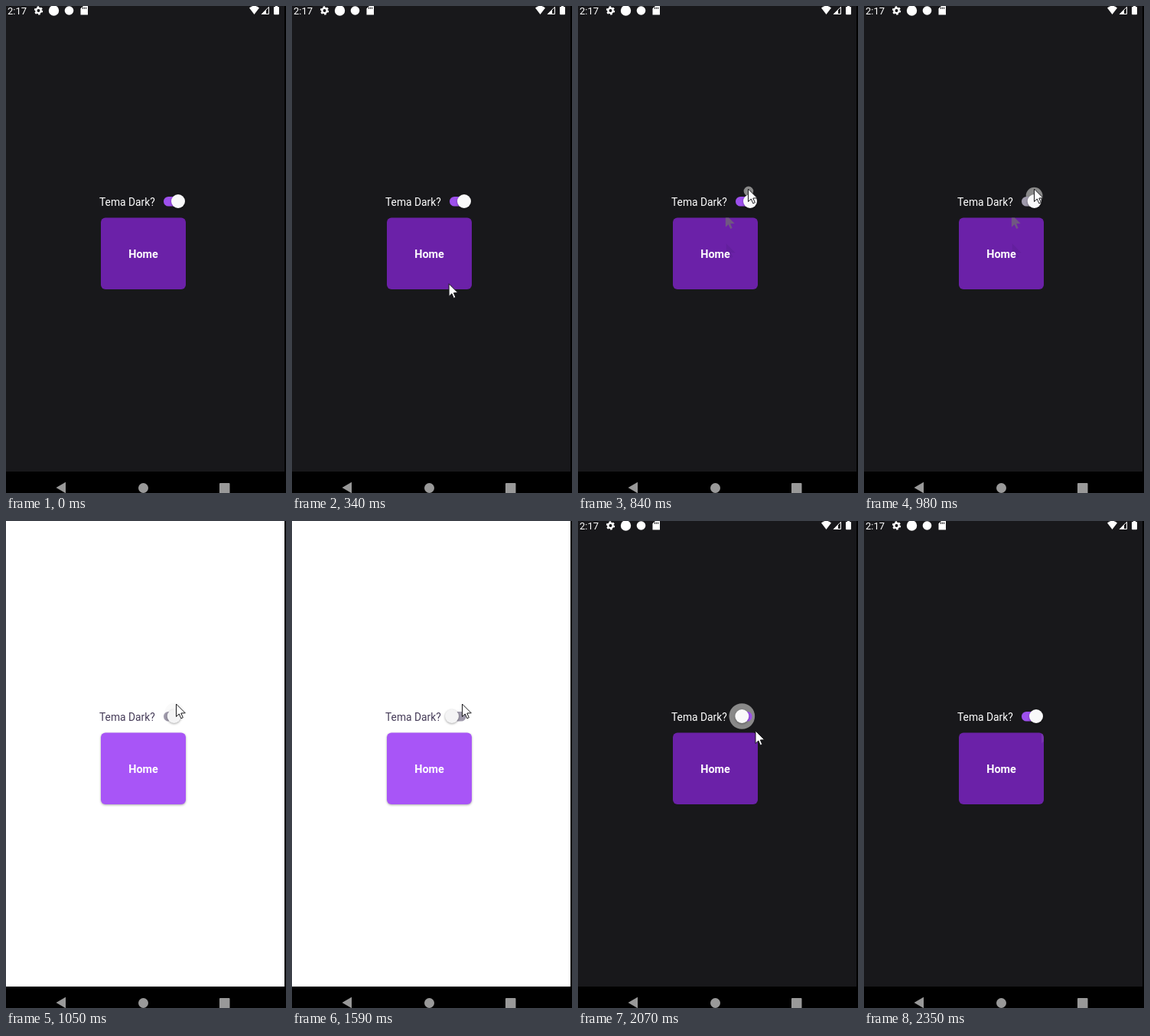
These frames come from a looping animation (366 by 636 pixels, 2.75 s). An HTML page with a canvas:

```html
<!DOCTYPE html>
<html lang="pt">
<head>
<meta charset="utf-8">
<style>
html, body { margin: 0; width: 366px; height: 636px; overflow: hidden; background: #000; }
canvas { display: block; }
</style>
</head>
<body>
<canvas id="stage" width="366" height="636"></canvas>
<script>
const c = document.getElementById('stage').getContext('2d');
const LOOP = 2750, TO_LIGHT = 1050, TO_DARK = 2070;

// Bursts of stepped movement: first step, last step, number of steps
const BURSTS = [[130, 620, 8], [770, 1260, 8], [1520, 2000, 7], [2070, 2350, 5]];

const lerp = (a, b, p) => a + (b - a) * p;
const mix = (a, b, p) => a.map((v, i) => lerp(v, b[i], p));
const progress = (t, from, to) => Math.min(1, Math.max(0, (t - from) / (to - from)));

function stepTime(t) {
  let q = 0;
  for (const [start, end, n] of BURSTS) {
    if (t < start) break;
    const step = (end - start) / (n - 1);
    q = Math.min(end, start + Math.floor((t - start) / step + 1e-6) * step);
  }
  return Math.round(q);
}

// The pointer curves in, taps twice and leaves in a straight line
const FIRST_TAP = [222.5, 239], SECOND_TAP = [219.5, 256], EXIT = [232, 274];
const arrival = p => {
  const bend = [134, 247];
  return mix(mix([302, 606], bend, p), mix(bend, FIRST_TAP, p), p);
};

function cursorAt(t) {
  if (t < 1520) return arrival(progress(t, 130, 620));
  if (t < TO_DARK) return mix(FIRST_TAP, SECOND_TAP, progress(t, 1520, 1680));
  return mix(EXIT, [325, 620], progress(t, TO_DARK, 2350));
}

function thumbAt(t) {
  const slide = start => progress(t, start, start + 350) ** 1.2;
  return 225 - 16 * (slide(910) - slide(1930));
}

function rect(x, y, w, h, color, r = 0) {
  c.fillStyle = color;
  c.beginPath();
  c.roundRect(x, y, w, h, r);
  c.fill();
}

function disc(x, y, r, color) {
  c.fillStyle = color;
  c.beginPath();
  c.arc(x, y, r, 0, 2 * Math.PI);
  c.fill();
}

function poly(color, ...p) {
  c.fillStyle = color;
  c.beginPath();
  for (let i = 0; i < p.length; i += 2) c.lineTo(p[i], p[i + 1]);
  c.closePath();
  c.fill();
}

function text(s, x, y, font, color, align = 'left') {
  c.font = font + ' Roboto, sans-serif';
  c.fillStyle = color;
  c.textAlign = align;
  c.fillText(s, x, y);
}

function raised(paint) {
  c.save();
  c.shadowColor = 'rgba(0,0,0,.35)';
  c.shadowBlur = 3;
  c.shadowOffsetY = 1;
  paint();
  c.restore();
}

function arrow([x, y], color, outline) {
  c.save();
  c.translate(x, y);
  poly(color, 0, 0, 0, 16.5, 3.8, 13, 6.3, 18.8, 8.8, 17.7, 6.3, 12, 11.8, 11.8);
  if (outline) {
    c.strokeStyle = outline;
    c.lineWidth = 1;
    c.stroke();
  }
  c.restore();
}

function ring(x, y, r, width, dash = []) {
  c.strokeStyle = '#fff';
  c.lineWidth = width;
  c.setLineDash(dash);
  c.beginPath();
  c.arc(x, y, r, 0, 2 * Math.PI);
  c.stroke();
  c.setLineDash([]);
}

function statusBar() {
  text('2:17', 2, 11, '13px', '#fff');
  // settings gear
  ring(42.5, 6, 3.2, 2.4);
  ring(42.5, 6, 4.8, 1.8, [2.5, 2.53]);
  disc(62.5, 6, 6.7, '#fff');
  disc(82.5, 6, 5.8, '#fff');
  // memory card
  poly('#fff', 101, 0, 107, 0, 107, 11.5, 97.5, 11.5, 97.5, 3.5);
  for (let i = 0; i < 3; i++) rect(100 + i * 2.1, 1.5, 1, 2.5, '#18181b');
  // wifi
  c.fillStyle = '#fff';
  c.beginPath();
  c.moveTo(324.5, 11);
  c.lineTo(318, 2.5);
  c.quadraticCurveTo(324.5, -3, 331, 2.5);
  c.fill();
  // signal
  poly('#fff', 333.5, 11, 340, 4.5, 340, 11);
  c.strokeStyle = '#fff';
  c.lineWidth = 1;
  c.beginPath();
  c.moveTo(334.5, 10.5);
  c.lineTo(343.5, 1.3);
  c.lineTo(343.5, 10.5);
  c.closePath();
  c.stroke();
  // battery
  rect(350, 1, 7, 10.3, '#fff', 1);
  rect(352, 0, 3, 2, '#fff');
}

function navBar() {
  rect(0, 608, 366, 28, '#000');
  rect(364, 0, 2, 636, '#000');
  poly('#999', 65.5, 629, 78, 621.7, 78, 636.3);
  disc(179.5, 629.5, 6.5, '#999');
  rect(279, 623, 13.5, 13.5, '#999', 1);
}

// Faint marks the pointer leaves on the button
function smudges(t) {
  c.save();
  c.beginPath();
  c.roundRect(124, 276.5, 111, 93.5, 6);
  c.clip();
  if (t >= 620 && t < TO_LIGHT) {
    arrow(arrival(4 / 7), 'rgba(40,20,80,.12)');
    arrow(arrival(5 / 7), 'rgba(115,110,115,.7)');
  }
  if (t > TO_DARK) arrow(EXIT, 'rgba(255,255,255,.08)');
  c.restore();
}

function ripple(t, thumb, dark) {
  const [press, origin] = t < 1520 ? [770, FIRST_TAP] : [1680, SECOND_TAP];
  if (t < press) return;
  const grow = progress(t, press, press + 390);
  const [x, y] = mix(origin, [thumb, 255], grow);
  c.globalAlpha = 1 - progress(t, press + 390, press + 490);
  disc(x, y, 4 + 12.8 * grow, dark ? '#898989' : '#fafafa');
  c.globalAlpha = 1;
}

function toggle(t, dark) {
  const thumb = thumbAt(t);
  const on = t < 980 || t >= 2000;
  ripple(t, thumb, dark);
  rect(206, 249, 21.5, 12.6, on ? '#9d50ec' : '#9f9aab', 6.3);
  raised(() => disc(thumb, 255, 9, dark ? '#f9f9fa' : '#f4f4f5'));
}

function button(dark) {
  const paint = () => rect(124, 276.5, 111, 93.5, dark ? '#6b21a8' : '#a855f7', 6);
  dark ? paint() : raised(paint);
}

function draw(time) {
  const t = stepTime(time);
  const dark = t < TO_LIGHT || t >= TO_DARK;
  rect(0, 0, 366, 636, dark ? '#18181b' : '#fff');
  if (dark) statusBar();
  text('Tema Dark?', 122, 260.5, '13.8px', dark ? '#fff' : '#453b58');
  toggle(t, dark);
  button(dark);
  smudges(t);
  text('Home', 179.5, 329, 'bold 14.4px', '#fff', 'center');
  navBar();
  if (t >= 130 && t < 2350) arrow(cursorAt(t), '#fff', '#18181b');
}

const start = performance.now();
function frame() {
  draw((performance.now() - start) % LOOP);
  requestAnimationFrame(frame);
}
frame();
</script>
</body>
</html>
```
